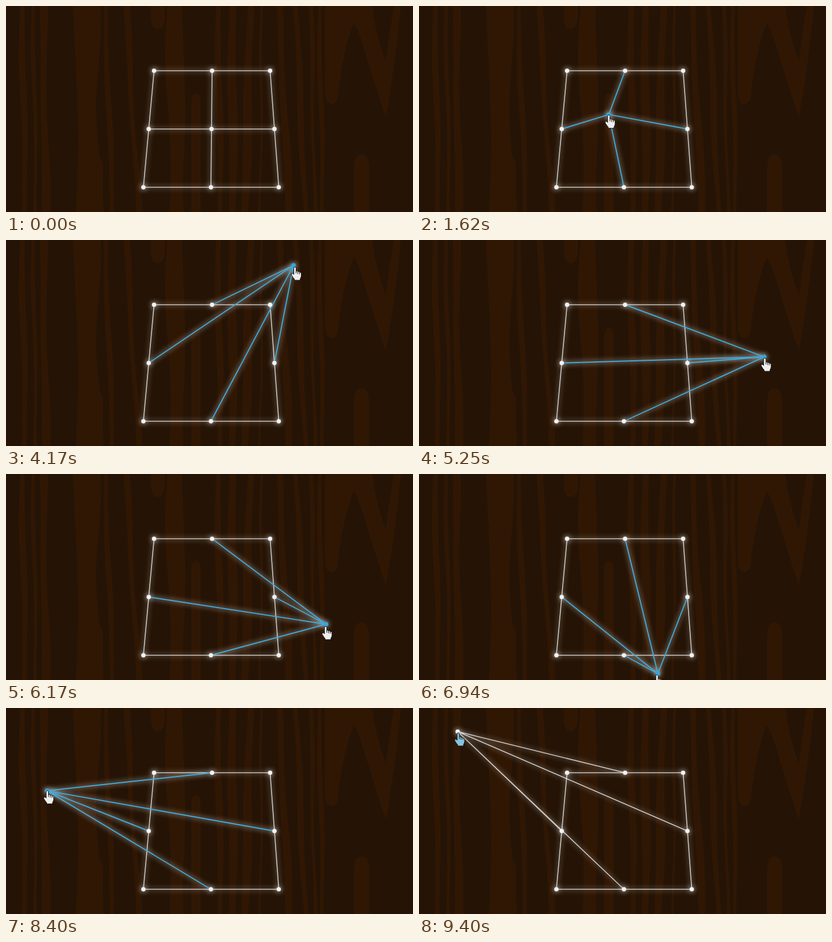
An HTML page for the animation above (9.48 s loop, 705 by 358 pixels).

```html
<!DOCTYPE html>
<html lang="en">
<head>
<meta charset="utf-8">
<title>Draggable grid</title>
<style>
html, body { margin: 0; width: 100%; height: 100%; overflow: hidden; background: #251405; }
svg { display: block; width: 705px; height: 358px; }
#wood { fill: #301704; }
.grid { filter: drop-shadow(0 0 5px #fff); }
.grid path { fill: none; stroke: #fff; stroke-opacity: .75; stroke-width: 1.6; }
.grid circle { fill: #f4f2f1; }
.grid.drag #spokes { stroke: #3eabdc; stroke-opacity: 1; stroke-width: 1.9; }
.grid.drag #knot { fill: #2ea9e0; }
#hand { fill: #f0eeed; stroke: #111; stroke-linejoin: round; }
#hand.done { fill: #86c4dd; }
</style>
</head>
<body>
<svg viewBox="0 0 705 358">
  <g id="wood">
    <path d="M575 0H634Q640 50 658 97Q664 50 672 0H684Q673 110 658 193Q640 140 622 80Q608 32 602 31Q585 70 575 150Z"/>
  </g>
  <g class="grid" id="grid">
    <path id="frame"/>
    <path id="spokes"/>
    <g id="dots"></g>
    <circle id="knot" r="3.8"/>
  </g>
  <path id="hand" d="M-2 13V2Q-2 0 0 0T2 2V7Q4 6 5 8Q7 7 8 9Q11 8.5 11 11V16Q10 19 9 21V23H-1V21Q-3 19 -6 14Q-7 11 -4.5 11Q-3 11.5 -2 13ZM2 7V11M5 8V12M8 9V12.5"/>
</svg>
<script>
const H = 358, LOOP = 9480, SHOW = 70, GRAB = 1180, DROP = 9400, LEAD = 12;
const $ = id => document.getElementById(id);
const grid = $('grid'), spokes = $('spokes'), knot = $('knot'), hand = $('hand');
const plank = d => $('wood').insertAdjacentHTML('beforeend', `<path d="${d}"/>`);

// Wood grain: wavy streaks that bend near three places
const bump = (x, c) => Math.exp(-(((x - c) / 30) ** 2));
const lean = x => 5 + 18 * bump(x, 200) + 16 * bump(x, 485) - 14 * bump(x, 425);

function streak(x, w) {
  const left = [], right = [];
  for (let y = 0; y < H + 12; y += 12) {
    const mid = x + lean(x) * y / H + 1.5 * Math.sin(y / 45 + x);
    const half = w / 2 * (1 + .2 * Math.sin(y / 60 + 2 * x));
    left.push([mid - half, y]);
    right.unshift([mid + half, y]);
  }
  plank(`M${left.concat(right).join('L')}Z`);
}

// Tongue of grain running from an edge to a round tip
function tongue(x, w, edge, tip) {
  const r = w / 2, bend = tip + Math.sign(edge - tip) * w;
  plank(`M${x - r} ${edge}L${x - r} ${bend}Q${x - r} ${tip} ${x} ${tip}T${x + r} ${bend}L${x + r} ${edge}Z`);
}

[[28, 9], [47, 6], [64, 12], [139, 40], [172, 8], [208, 9], [292, 27], [367, 10],
 [392, 13], [423, 13], [443, 4], [473, 11], [502, 9], [528, 6], [543, 7]]
  .forEach(([x, w]) => streak(x, w));
tongue(263, 24, 0, 40);
tongue(564, 23, 0, 170);
tongue(157, 22, H, 262);
tongue(329, 16, H, 152);
tongue(616, 26, H, 258);

// Corners and middles of the slanted square; a and b run from 0 to 2
const spot = (a, b) => [
  a === 1 ? 357 - b : a ? 457.5 + 7.5 * b : 256.5 - 9.25 * b,
  112.5 + 101.25 * b
];
const HOME = spot(1, 1);
const mids = [spot(1, 0), spot(2, 1), spot(1, 2), spot(0, 1)];
const corners = [spot(0, 0), spot(2, 0), spot(2, 2), spot(0, 2)];
$('frame').setAttribute('d', `M${corners.join('L')}Z`);
$('dots').innerHTML = [...mids, ...corners]
  .map(([x, y]) => `<circle cx="${x}" cy="${y}" r="3.8"/>`).join('');

// Turning points of the pointer: time, x, y
const KEYS = [
  [SHOW, 500, 345], [780, 349, 214], [GRAB, 349, 214], [2790, 239, 52], [3700, 420, 21],
  [4170, 498, 44], [5250, 598, 203], [5630, 597, 206], [6940, 414, 347],
  [7550, 199, 335], [8400, 71, 144], [8950, 61, 60], [DROP, 67, 41]
];

const rate = (a, b, k) => (b[k] - a[k]) / (b[0] - a[0]);

// Harmonic mean of both sides keeps the curve from overshooting
function slope(i, k) {
  if (!KEYS[i - 1] || !KEYS[i + 1]) return 0;
  const p = rate(KEYS[i - 1], KEYS[i], k), q = rate(KEYS[i], KEYS[i + 1], k);
  return p * q > 0 ? 2 * p * q / (p + q) : 0;
}

function pointer(t) {
  t = Math.min(Math.max(t, SHOW), DROP);
  const i = Math.max(1, KEYS.findIndex(key => key[0] >= t));
  const a = KEYS[i - 1], b = KEYS[i], d = b[0] - a[0];
  const u = (t - a[0]) / d, v = 1 - u;
  return [1, 2].map(k =>
    v * v * (1 + 2 * u) * a[k] + u * u * (3 - 2 * u) * b[k] +
    d * u * v * (v * slope(i - 1, k) - u * slope(i, k)));
}

function draw(t) {
  const [x, y] = t < GRAB ? HOME : pointer(t);
  const [hx, hy] = pointer(t + LEAD);
  grid.classList.toggle('drag', t >= GRAB && t < DROP);
  spokes.setAttribute('d', mids.map(m => `M${x} ${y}L${m}`).join(''));
  knot.setAttribute('cx', x);
  knot.setAttribute('cy', y);
  hand.setAttribute('transform', `translate(${hx + 1} ${hy + 2})`);
  hand.setAttribute('visibility', t < SHOW ? 'hidden' : 'visible');
  hand.classList.toggle('done', t >= DROP);
}

const start = performance.now();
function tick() {
  draw((performance.now() - start) % LOOP);
  requestAnimationFrame(tick);
}
tick();
</script>
</body>
</html>
```
